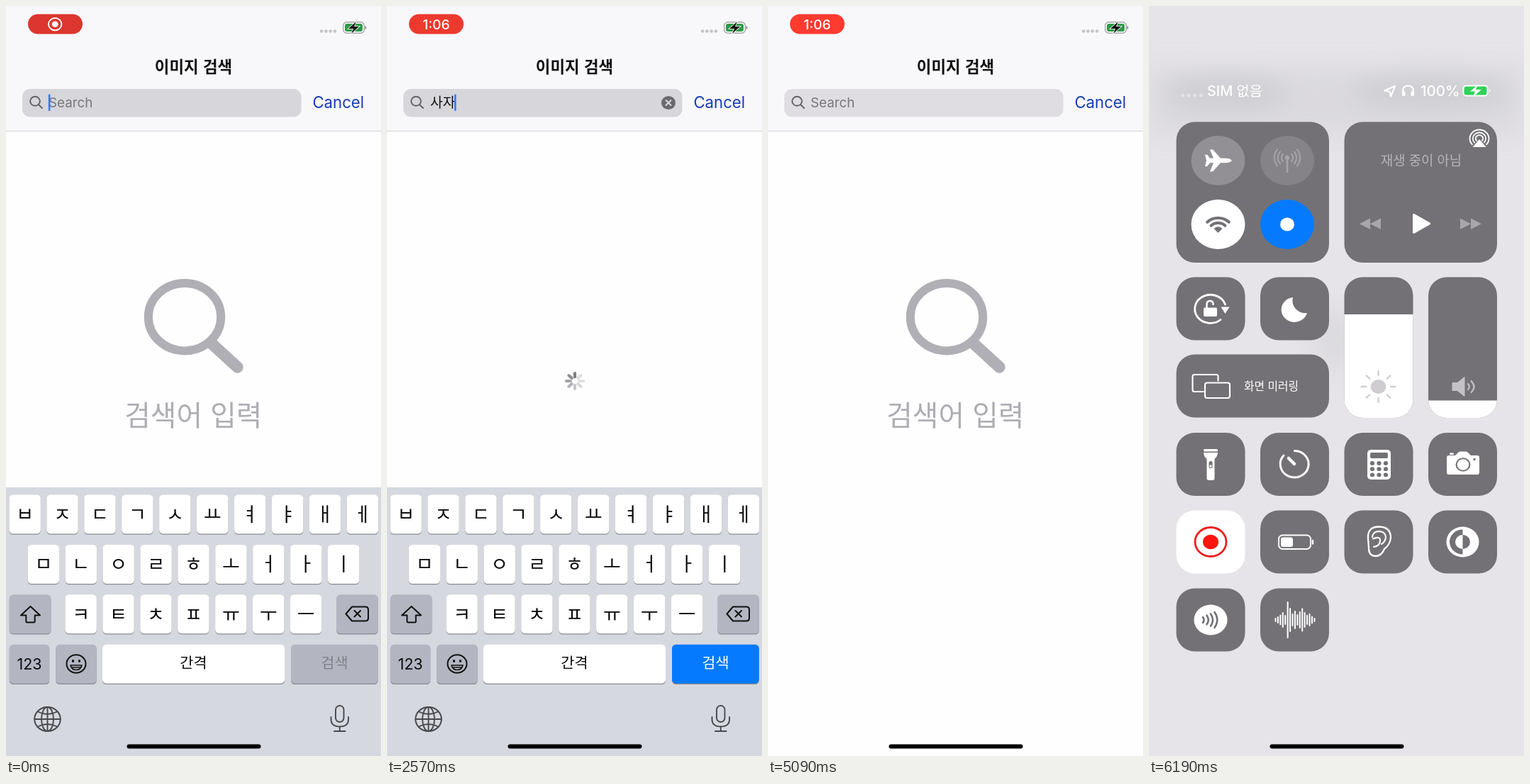
An HTML page that plays this animation: 529x1058 px, repeating every 6.29 s.

```html
<!DOCTYPE html>
<html lang="ko">
<head>
<meta charset="utf-8">
<title>이미지 검색</title>
<style>
html, body { margin: 0; width: 100%; height: 100%; overflow: hidden; background: #fefefe; }
svg { position: absolute; left: 0; top: 0; width: 100%; height: 100%; }
text { font-family: Inter, "Noto Sans CJK KR", "Noto Sans CJK", sans-serif; }
.ko { font-family: "Noto Sans CJK KR", "Noto Sans CJK", sans-serif; }
.mid { text-anchor: middle; }
.line { fill: none; stroke-linecap: round; stroke-linejoin: round; }
.tile { fill: #737175; }
.cut { fill: #737175; }
.icon { fill: #fff; }
.icon .line { stroke: #fff; }
.icon .dark, .dark { stroke: #737175; }
</style>
</head>
<body>
<svg id="app" viewBox="0 0 529 1058">
  <rect width="529" height="1058" fill="#fefefe"/>
  <rect width="529" height="176" fill="#f8f7fa"/>
  <rect y="176" width="529" height="1" fill="#d2d1d5"/>

  <rect id="pill" x="31" y="11.5" width="77" height="28" rx="14"/>
  <g id="pillIcon">
    <ellipse class="line" cx="69.2" cy="25.7" rx="9.2" ry="8.6" stroke="#fff" stroke-width="2"/>
    <ellipse cx="69.2" cy="25.7" rx="4.5" ry="4.2" fill="#fff"/>
  </g>
  <text id="pillTime" class="mid" x="69.5" y="32.5" font-size="19.3" font-weight="500" fill="#fff">1:06</text>
  <path class="line" d="M445 35.5h.1M451.3 35.5h.1M457.6 35.5h.1M463.9 35.5h.1" stroke="#c4c3c8" stroke-width="4.6"/>
  <rect x="475.7" y="22.7" width="29.6" height="15.6" rx="5" fill="#fff" stroke="#a3a3a6" stroke-width="1.4"/>
  <rect x="478" y="25" width="25" height="11" rx="3" fill="#2d9a48"/>
  <path d="M507 28.5q2 2 0 4z" stroke="#8e8e92"/>
  <path d="M494 22l-11 10h7l-3 7 11-10h-7z" fill="#111" stroke="#fff" stroke-width="1.6" paint-order="stroke"/>

  <text class="ko mid" x="264.5" y="94.3" font-size="22.4" font-weight="600" fill="#111">이미지 검색</text>
  <rect id="field" x="23" y="117" width="393.5" height="39.5" rx="11"/>
  <g class="line" stroke="#626167" stroke-width="1.9">
    <ellipse cx="41" cy="134.3" rx="6.9" ry="6.5"/><path d="M46 139.3l5 4.7"/>
  </g>
  <text id="hint" x="60" y="143" font-size="18.8" fill="#77767c">Search</text>
  <text id="query" class="ko" x="61" y="142.5" font-size="19.3" fill="#111"></text>
  <g id="clear">
    <ellipse cx="397" cy="136.5" rx="10" ry="9.5" fill="#6a696e"/>
    <path class="line" d="M393.5 133l7 7m0-7l-7 7" stroke="#dddce0" stroke-width="1.9"/>
  </g>
  <rect id="caret" y="124.5" width="2.6" height="23.5" rx="1.2" fill="#2f7cf6"/>
  <text x="432.4" y="144" font-size="22.2" fill="#153cb6">Cancel</text>

  <g id="empty">
    <ellipse class="line" cx="252" cy="438.7" rx="51.2" ry="47.7" stroke="#b0afb5" stroke-width="12"/>
    <path class="line" d="M291 477l35.5 32.5" stroke="#b0afb5" stroke-width="16.5"/>
    <text class="ko mid" x="264.3" y="592" font-size="39.8" font-weight="300" fill="#aeadb3">검색어 입력</text>
  </g>
  <g id="spinner" class="line" stroke="#737278" stroke-width="4.2"></g>
  <g id="toast">
    <rect x="121" y="504" width="287" height="50.5" rx="11" fill="#000" fill-opacity=".8"/>
    <text class="ko mid" x="264.5" y="536" font-size="21.5" fill="#fff">잠시 후에 다시 시도해주세요.</text>
  </g>
  <g id="board"></g>
  <rect x="170.5" y="1041.5" width="189" height="6" rx="3"/>
</svg>

<svg id="panel" viewBox="0 0 529 1058">
  <defs>
    <filter id="soft" x="-50%" y="-100%" width="200%" height="300%"><feGaussianBlur stdDeviation="17"/></filter>
    <clipPath id="clipA"><rect x="275.5" y="382.5" width="97" height="198.5" rx="26"/></clipPath>
    <clipPath id="clipB"><rect x="394" y="382.5" width="97" height="198.5" rx="26"/></clipPath>
  </defs>
  <g id="veil">
    <rect width="529" height="1058" fill="#e6e4e8"/>
    <g filter="url(#soft)" fill="#bfbfc4">
      <rect x="0" y="88" width="529" height="92" opacity=".28"/>
      <ellipse cx="110" cy="122" rx="85" ry="26" opacity=".45"/>
      <ellipse cx="395" cy="120" rx="110" ry="26" opacity=".45"/>
      <ellipse cx="262" cy="470" rx="28" ry="45" opacity=".3"/>
    </g>
  </g>
  <g id="modules"></g>
  <rect id="bar" x="170.5" y="1041.5" width="189" height="6" rx="3"/>
</svg>

<script>
const LOOP = 6290, OPEN = 5390;
const $ = id => document.getElementById(id);
const clamp = v => Math.max(0, Math.min(1, v));
const ramp = (t, a, b) => clamp((t - a) / (b - a));
const ease = x => x * x * (3 - 2 * x);
const mix = (a, b, k) => a + (b - a) * k;
const show = (id, on) => $(id).style.opacity = +on;
const times = (n, f) => Array.from({ length: n }, (_, i) => f(i)).join('');
const stroke = (d, w, extra = '') => `<path class="line ${extra}" d="${d}" stroke-width="${w}"/>`;
const ring = (x, y, rx, ry, w) =>
  `<ellipse class="line" cx="${x}" cy="${y}" rx="${rx}" ry="${ry}" stroke-width="${w}"/>`;
const disc = (x, y, rx, ry, attr = '') => `<ellipse cx="${x}" cy="${y}" rx="${rx}" ry="${ry}" ${attr}/>`;
const box = (x, y, w, h, r, attr = '') =>
  `<rect x="${x}" y="${y}" width="${w}" height="${h}" rx="${r}" ${attr}/>`;

// Keyboard
function key(x, y, w, fill, label = '', size = 27, color = '#0c0c0c', id = '') {
  const latin = /\d/.test(label);
  const base = y + 27.5 + size * (label.length > 1 && !latin ? .28 : .37);
  return box(x, y + 1.3, w, 55, 5.5, 'fill="#898b91"') +
    box(x, y, w, 55, 5.5, `fill="${fill}" id="${id}"`) +
    `<text class="mid ${latin ? '' : 'ko'}" id="${id && id + 'Text'}" x="${x + w / 2}" y="${base}" font-size="${size}" fill="${color}">${label}</text>`;
}
const GRAY = '#b3b6c1';
const rows = [['ㅂㅈㄷㄱㅅㅛㅕㅑㅐㅔ', 4.4, 689.5], ['ㅁㄴㅇㄹㅎㅗㅓㅏㅣ', 30.6, 760], ['ㅋㅌㅊㅍㅠㅜㅡ', 83.4, 830.3]];
$('board').innerHTML =
  '<rect y="679" width="529" height="379" fill="#d6d8df"/>' +
  rows.map(([s, x, y]) => [...s].map((c, i) => key(x + i * 52.93, y, 44.4, '#fff', c)).join('')).join('') +
  key(4.8, 830.3, 58.6, GRAY) + key(466, 830.3, 58.8, GRAY) +
  key(4.8, 900.7, 56.4, GRAY, '123', 21.5) + key(70.3, 900.7, 57.4, GRAY) +
  key(136, 900.7, 257, '#fff', '간격', 20.8) +
  key(402, 900.7, 122.8, GRAY, '검색', 20.8, '#808289', 'go') +
  '<g class="line" stroke="#111" stroke-width="2">' +
  '<path d="M34.5 847L21 859.5h7.3v8.5q0 1.5 1.5 1.5h9.4q1.5 0 1.5-1.5v-8.500H48z"/>' +
  '<path d="M488 847.5h19q4 0 4 4v12q0 4-4 4h-19l-8.500-10zM491.500 853l8.500 8.500m0-8.500l-8.500 8.500"/>' +
  ring(99, 928, 13.5, 12.7, 2) +
  '<path d="M91 930h16q-1.500 6.500-8 6.500t-8-6.500zM93 933h12" stroke-width="1.6"/></g>' +
  disc(94.5, 924, 1.5, 2) + disc(103.5, 924, 1.5, 2) +
  '<g class="line" stroke="#48494d" stroke-width="1.9">' +
  ring(58.5, 1006, 18.3, 17, 2) + ring(58.5, 1006, 8.5, 17, 1.9) +
  '<path d="M58.5 989v34M40.5 1006h36M45 995.5q13.5 7 27 0M45 1016.500q13.5-7 27 0"/>' +
  '<rect x="465" y="987" width="11.5" height="23" rx="5.7"/>' +
  '<path d="M458.5 1003v3q0 10.5 12.300 10.500t12.300-10.500v-3M470.800 1017v6M463 1023h15.600"/></g>';

const spoke = i => {
  const a = i * Math.PI / 4, x = Math.sin(a), y = -Math.cos(a);
  return `<path d="M${265 + 6.2 * x} ${529 + 5.8 * y}L${265 + 12 * x} ${529 + 11 * y}"/>`;
};
$('spinner').innerHTML = times(8, spoke);
const spokes = [...$('spinner').children];

// Control panel modules: [x, y, w, h, content, tile attributes]
const icon = s => `<g class="icon">${s}</g>`;
const arcs = (x, y, rs, a, w, extra = '') => rs.map(r => {
  const dx = r * 1.08 * Math.sin(a), dy = r * Math.cos(a);
  return stroke(`M${x - dx} ${y - dy}A${r * 1.08} ${r} 0 ${a > Math.PI / 2 ? 1 : 0} 1 ${x + dx} ${y - dy}`, w, extra);
}).join('');
const S = 97, H = 89;
const C = [38.5, 157, 275.5, 394];

const radios =
  disc(97.5, 218, 38, 35, 'fill="#929094"') + disc(195, 218, 38, 35, 'fill="#858387"') +
  disc(97.5, 308, 38, 35, 'fill="#fff"') + disc(195, 308, 38, 35, 'fill="#067aff"') +
  disc(195, 308, 10, 9.5, 'fill="#fff"') +
  icon('<path d="M117 218q-3-3.2-9-3.2h-7L90 202.500h-4l5 12.300h-5l-4-5h-3l2 8.200-2 8.200h3l4-5h5l-5 12.300h4l11-12.300h7q6 0 9-3.200z"/>') +
  '<g stroke="#a5a3a7" fill="#a5a3a7">' + disc(195, 214, 3, 3) + stroke('M195 216v18', 2.6) +
  [8, 13, 18].map(r => [-1, 1].map(k =>
    stroke(`M${195 + k * r * .78} ${214 - r * .65}Q${195 + k * r * 1.25} 214 ${195 + k * r * .78} ${214 + r * .65}`, 2.2)).join('')).join('') + '</g>' +
  arcs(97.5, 319, [20, 13], .78, 4.2, 'dark') +
  '<path class="cut" d="M97.5 320l-6-6q6-5.500 12 0z"/>';

const media =
  icon(arcs(466, 187, [12.5, 8.5, 4.8], 2.3, 1.8) + '<path d="M466 188l9.500 11h-19z"/>' +
    '<path d="M372 295q0-3 3-1.500l21 12q2.500 1.500 0 3l-21 12q-3 1.500-3-1.500z"/>') +
  '<path fill="#a8a6aa" d="M312 299.500v15.500l-15-7.700zM327 299.500v15.500l-15-7.700zM439 299.500v15.500l15-7.700zM454 299.500v15.500l15-7.700z"/>' +
  '<text class="ko mid" x="384" y="225" font-size="18.8" fill="#b7b5b9">재생 중이 아님</text>';

const sun = '<g clip-path="url(#clipA)"><rect x="275" y="435" width="98" height="150" fill="#fff"/></g>' +
  disc(323.5, 537, 10.8, 10, 'fill="#cfcdd1"') + '<g stroke="#cfcdd1">' +
  times(8, i => {
    const x = Math.cos(i * Math.PI / 4), y = Math.sin(i * Math.PI / 4);
    return stroke(`M${323.5 + 17.5 * x} ${537 + 16 * y}L${323.5 + 24 * x} ${537 + 22 * y}`, 2.3);
  }) + '</g>';
const volume = '<g clip-path="url(#clipB)"><rect x="394" y="556.5" width="98" height="30" fill="#fff"/></g>' +
  '<g fill="#c3c1c5" stroke="#c3c1c5"><path d="M428 531.5h7l10-8v27l-10-8h-7z"/>' +
  stroke('M450 533q3.5 4 0 8M454.5 529q8 8 0 16', 2.2) + '</g>';

const lock = stroke('M107.5 421A22 20 0 1 0 101 442.5', 2.8) + '<path d="M101.5 424.5h12l-6 9.500z"/>' +
  box(77, 425.5, 19, 12.5, 2) + stroke('M81.5 425v-4q0-5 4.500-5t4.500 5', 2.5);
const moon = '<path d="M203 411A18.5 17.5 0 1 0 223 433A18 17.5 0 0 1 203 411z"/>';
const mirror = stroke('M77 544H64q-2.5 0-2.500-2.500v-19q0-2.500 2.500-2.500h31q2.500 0 2.500 2.500v6', 2.1) +
  '<rect class="line" x="79" y="531.5" width="35" height="21.5" rx="3" stroke-width="2.1"/>' +
  '<text class="ko" x="134" y="542" font-size="15.8" font-weight="500">화면 미러링</text>';
const torch = box(77, 625, 20, 3.5, 1.5) +
  '<path d="M77 630h20q0 5-4.500 9v27q0 3-3 3h-5q-3 0-3-3v-27q-4.500-4-4.500-9z"/>' + box(84.5, 642, 5, 10, 2.5, 'class="cut"') + disc(87, 649, 1.7, 1.7);
const timer = stroke('M205.5 627.5A20 18.7 0 1 1 190 634', 3) + stroke('M197 638l8 8', 4.5);
const calc = box(308, 626, 33, 42, 5) + box(312, 630, 25, 8, 2, 'class="cut"') +
  times(9, i => disc(315 + i % 3 * 9.5, 645 + (i / 3 | 0) * 8.2, 3.1, 2.9, 'class="cut"'));
const camera = '<path d="M423 634h9l4-4q1-1.500 3-1.500h8q2 0 3 1.500l4 4h9q3 0 3 3v21q0 3-3 3h-40q-3 0-3-3v-21q0-3 3-3z"/>' +
  box(424, 630.5, 6, 2.5, 1) + disc(443, 647, 10.5, 9.7, 'class="cut"') + disc(443, 647, 8.3, 7.7) + disc(459, 639.5, 1.7, 1.7, 'class="cut"');
const record = '<g stroke="#ed1c1c">' + ring(87, 756, 22, 20.5, 2.8) + '</g>' + disc(87, 756, 11, 10.3, 'id="dot" fill="#ff1410"');
const power = '<rect class="line" x="183" y="746.5" width="45" height="19.5" rx="5.5" stroke-width="2"/>' +
  box(186, 749.5, 17, 13.5, 3) + stroke('M231 754v4.5', 2.4);
const ear = stroke('M309 751Q308 734.5 324.5 734.5Q341 735 341 750Q340 760 332 766Q328 776 319 776Q309.5 775 310 764Z', 2.3) +
  stroke('M315 749Q316 741 325 741Q334 742 334 750Q333 756 328 759M316 751.5Q327 747 326 755Q325 762 317 763', 2.1);
const contrast = disc(442.5, 756, 23, 21.5) +
  '<path class="cut" d="M442.5 738.5a18.5 17.5 0 0 0 0 35zM442.5 746a10.5 10 0 0 1 0 20z"/>' +
  '<path d="M442.5 746a10.5 10 0 0 0 0 20z"/>';
const waves = disc(87, 866, 23.5, 21.5) +
  times(4, i => stroke(`M${76 + i * 5.5} ${862 - i * 2.3}q${3 + i * 1.5} ${4 + i * 2.3} 0 ${8 + i * 4.6}`, 2.6, 'dark'));
const sound = [4, 8, 13, 20, 12, 50, 32, 16, 24, 14, 22, 31, 20, 12, 16, 9, 4].map((h, i) =>
  stroke(`M${178.5 + i * 3.43} ${866 - h / 2}v${h}`, 2)).join('');

const status = '<path class="line" d="M47.5 126h.1M56 126h.1M64.5 126h.1M73 126h.1" stroke="#efeff1" stroke-opacity=".6" stroke-width="5"/>' +
  '<text x="82" y="127" font-size="19.8" font-weight="500" fill="#fff">SIM 없음</text>';
const statusRight = icon(stroke('M347 113l-15 6.500 7.500 1.300 1.500 7z', 2) +
  stroke('M358 124v-4q0-7.500 7.500-7.500t7.500 7.500v4', 2) + box(357, 120, 4.5, 7, 2) + box(369.5, 120, 4.5, 7, 2) +
  '<text x="383" y="126.5" font-size="20.5" font-weight="500">100%</text>' +
  box(442.5, 111.5, 36, 16, 5) + '<path d="M480 117q3 2.5 0 5z"/>') +
  box(444.5, 113.5, 32, 12, 3, 'fill="#30d158"') + icon('<path d="M464 111l-11 9.500h7l-3 7.500 12-10h-8z"/>');

const row = (y, items) => items.map((s, i) => [C[i], y, S, H, icon(s)]);
const modules = [
  [38.5, 163.5, 215.5, 198.5, radios], [275.5, 163.5, 215.5, 198.5, media],
  ...row(382.5, [lock, moon]),
  [275.5, 382.5, S, 198.5, sun], [394, 382.5, S, 198.5, volume],
  [38.5, 491.5, 215.5, H, icon(mirror)],
  ...row(602, [torch, timer, calc, camera]),
  [38.5, 711.5, S, H, record, 'fill="#fff"'],
  ...row(711.5, ['', power, ear, contrast]).slice(1),
  ...row(821.5, [waves, sound])
];
$('modules').innerHTML = `<g>${status}</g><g>${statusRight}</g>` + modules.map(([x, y, w, h, body, attr]) =>
  `<g>${box(x, y, w, h, 26, attr || 'class="tile"')}${body}</g>`).join('');
const parts = [...$('modules').children];

function drawPanel(t) {
  const open = t >= OPEN;
  $('panel').style.display = open ? '' : 'none';
  $('app').style.filter = open ? `blur(${24 * ramp(t, OPEN, 5700)}px)` : 'none';
  if (!open) return;

  // Modules settle from a pulled-down, shrunken pose
  const pull = (ramp(t, 6190, 5790 - 400) * 2) ** 2;
  show('veil', ease(ramp(t, OPEN, 5760)));
  show('modules', ease(ramp(t, OPEN, 5700)));
  show('bar', mix(.2, 1, ramp(t, 5790, 6150)));
  [1.5, 5].forEach((dx, i) =>
    parts[i].setAttribute('transform', `translate(${dx * pull} ${17.5 * pull})`));
  modules.forEach(([x, y, w, h], i) => {
    const cx = x + w / 2, cy = y + h / 2, u = (cy - 262.5) / 603;
    const s = 1 - (.046 + .048 * u) * pull;
    const dy = (17.5 - 9.5 * u ** 1.4) * pull;
    const g = parts[i + 2];
    g.setAttribute('transform', `translate(${cx} ${cy + dy}) scale(${s}) translate(${-cx} ${-cy})`);
    const fade = 1 - (.07 + .1 * u) * pull;
    g.querySelectorAll('.tile, .icon').forEach(e => e.style.opacity = fade);
  });
  show('dot', 1 - .4 * Math.min(pull, 1.5));
}

// Typing: [time, text, caret x]
const typed = [[1450, 'ㅅ', 79], [1650, '사', 78.5], [1850, '샂', 78.5], [2050, '사자', 95]];
const SEARCH = 2300, FAIL = 2700;

function draw(t) {
  const k = (1 - Math.cos(t / 2050 * 2 * Math.PI)) / 2;
  $('pill').setAttribute('fill', `rgb(${mix(220, 255, k)},${mix(54, 59, k)},${mix(46, 48, k)})`);
  const clock = ramp(t, 450, 600);
  show('pillIcon', 1 - clock);
  show('pillTime', clock);

  const done = t >= FAIL;
  const now = done ? null : typed.filter(s => t >= s[0]).pop();
  $('query').textContent = now ? now[1] : '';
  show('hint', !now);
  show('clear', !!now);
  $('field').setAttribute('fill', done ? '#dfdde1' : '#d6d6db');
  $('caret').setAttribute('x', now ? now[2] : 59.8);
  const p = t % 1000;
  show('caret', done ? 0 : now ? 1 : 1 - ramp(p, 350, 450) + ramp(p, 700, 800));
  $('go').setAttribute('fill', now ? '#067aff' : GRAY);
  $('goText').setAttribute('fill', now ? '#fff' : '#808289');

  const busy = t >= SEARCH && !done;
  show('empty', !busy);
  show('spinner', busy);
  const head = Math.floor((t - 2500) / 125) + 80;
  spokes.forEach((e, i) => {
    e.style.opacity = Math.max(.22, .92 - (head - i) % 8 * .13);
  });
  const slide = 1 - (1 - ramp(t, FAIL, FAIL + 380)) ** 3;
  $('board').setAttribute('transform', `translate(0 ${381 * slide})`);
  show('toast', ramp(t, FAIL, FAIL + 200) * (1 - ramp(t, 4500, 4700)));
  drawPanel(t);
}

const start = performance.now();
function tick() {
  draw((performance.now() - start) % LOOP);
  requestAnimationFrame(tick);
}
draw(0);
requestAnimationFrame(tick);
</script>
</body>
</html>
```
